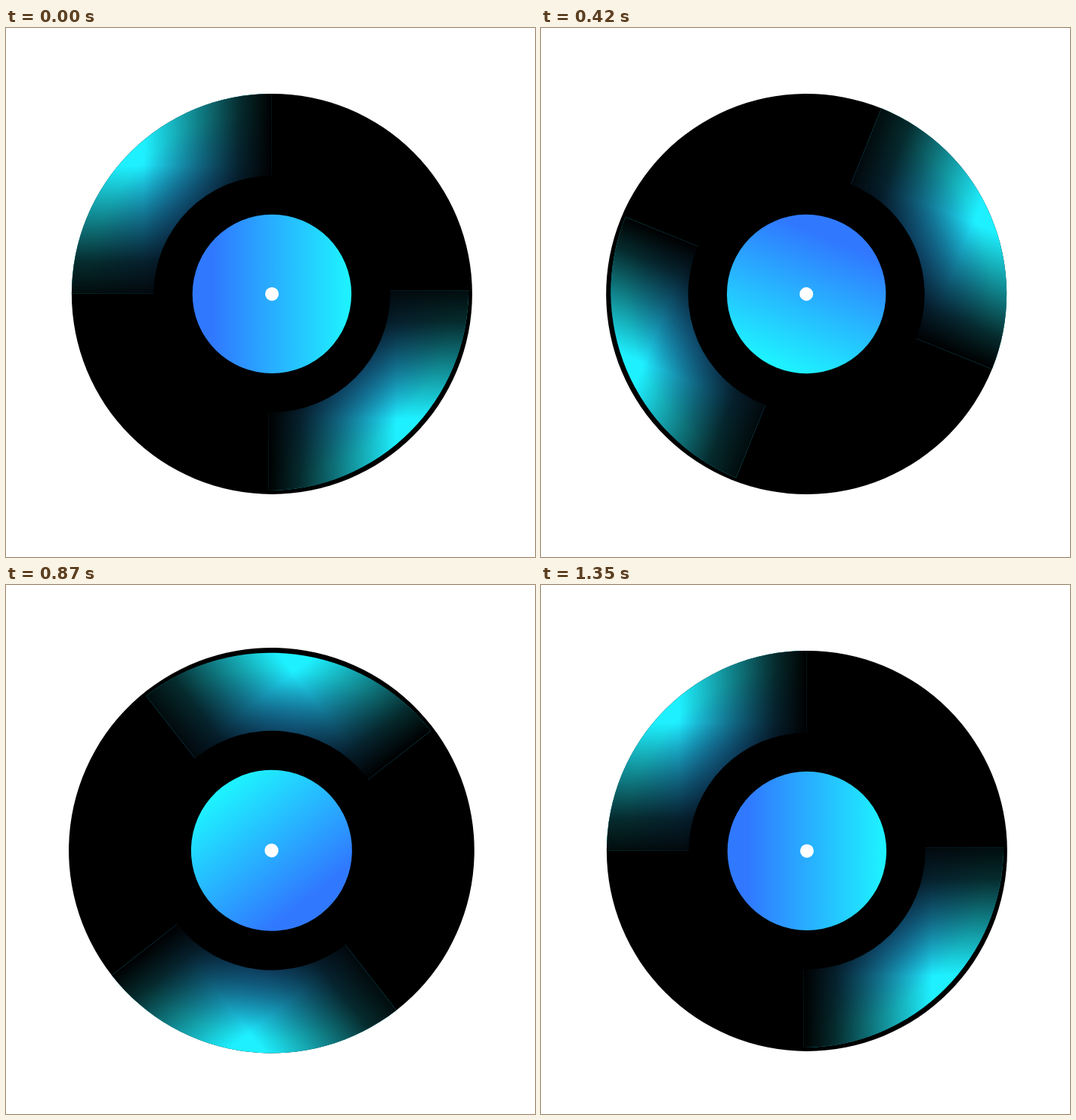
These frames come from a looping animation (700 px wide and 700 px high, 1380 ms). An HTML page with a canvas:

```html
<!DOCTYPE html>
<html lang="en">
<head>
<meta charset="utf-8">
<title>Spinning record</title>
<style>
  html, body { margin: 0; height: 100%; overflow: hidden; background: #fff; }
  canvas { display: block; }
</style>
</head>
<body>
<canvas id="stage" width="700" height="700"></canvas>
<script>
const ctx = document.getElementById('stage').getContext('2d');
const STEP = 30, STEPS = 46;
const DISC = 265, CORE = 156.5, LABEL = 105.2, HOLE = 9;
const BLUE = '#3079ff', CYAN = '#1ef0ff';

function withStops(gradient, stops) {
  for (const [at, color] of stops) gradient.addColorStop(at, color);
  return gradient;
}

const labelFill = withStops(ctx.createLinearGradient(-78, 0, 98, 0), [[0, BLUE], [1, CYAN]]);
const shineFill = withStops(ctx.createRadialGradient(0, 0, 145, 0, 0, 245), [[0, '#2299f4'], [1, CYAN]]);

// Black veil that clears away from the wedge's straight edge
const veil = (x, y, start) => withStops(ctx.createLinearGradient(0, 0, x, y), [
  [0, `rgba(0,0,0,${start})`], [0.25, 'rgba(0,0,0,.82)'],
  [0.5, 'rgba(0,0,0,.55)'], [1, 'rgba(0,0,0,0)']
]);
const veils = [veil(-170, 0, 1), veil(0, -170, 0.95)];

function circle(radius, fill) {
  ctx.beginPath();
  ctx.arc(0, 0, radius, 0, 2 * Math.PI);
  if (fill) {
    ctx.fillStyle = fill;
    ctx.fill();
  }
}

function shine(offset, turn) {
  ctx.save();
  ctx.translate(offset, offset);
  ctx.rotate(turn);
  circle(DISC);
  ctx.clip();
  for (const fill of [shineFill, ...veils]) {
    ctx.fillStyle = fill;
    ctx.fillRect(-272, -272, 272, 272);
  }
  ctx.restore();
}

const smooth = x => x * x * (3 - 2 * x);
const clamp = x => Math.min(1, Math.max(0, x));

// Swells over steps 15 to 23, settles by step 30
function scaleAt(step) {
  const swell = step < 23 ? (step - 15) / 8 : (30 - step) / 7;
  return 1 + 0.2264 * smooth(clamp(swell));
}

function draw() {
  const step = Math.floor(performance.now() / STEP) % STEPS;
  const scale = scaleAt(step);
  ctx.setTransform(1, 0, 0, 1, 0, 0);
  ctx.fillStyle = '#fff';
  ctx.fillRect(0, 0, 700, 700);
  ctx.translate(351.5, 351.7);
  ctx.rotate(step * 8 * Math.PI / 180);
  ctx.scale(scale, scale);
  ctx.translate(0.4, 0.2);
  circle(DISC, '#000');
  shine(0, 0);
  shine(-4.8, Math.PI);
  circle(CORE, '#000');
  circle(LABEL, labelFill);
  circle(HOLE, '#fff');
  requestAnimationFrame(draw);
}
draw();
</script>
</body>
</html>
```
